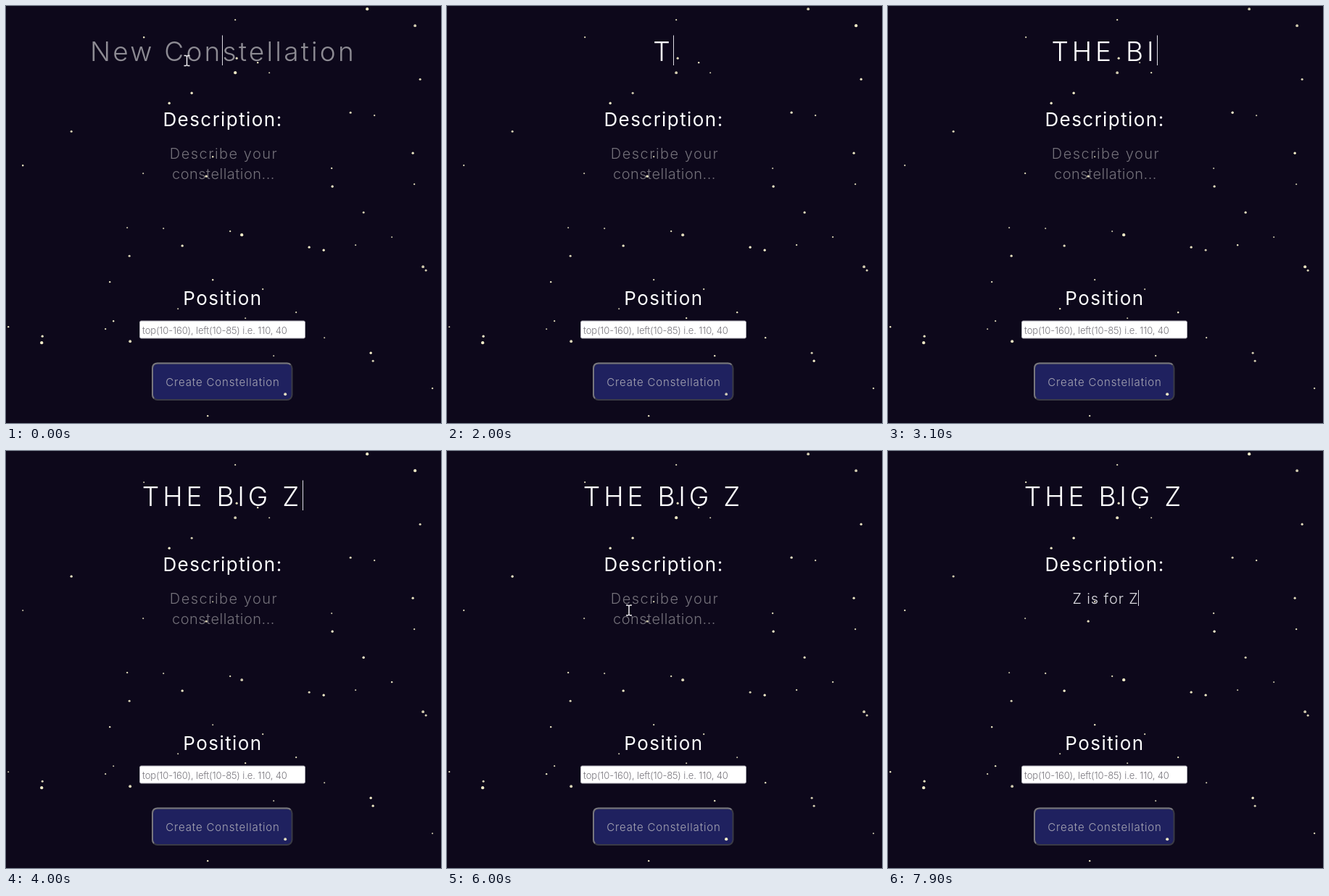
These frames come from a looping animation (600 px wide and 576 px high, 8 s). An HTML page:

```html
<!DOCTYPE html>
<html lang="en">
<head>
<meta charset="utf-8">
<title>New Constellation</title>
<style>
  html, body { margin: 0; width: 100%; height: 100%; overflow: hidden; background: #0d081b; }
  svg { display: block; width: 600px; height: 576px; }
  text { font-family: Inter, "DejaVu Sans", sans-serif; font-weight: 300; fill: #fff; white-space: pre; }
  .mid { text-anchor: middle; }
  .title { font-size: 37px; letter-spacing: .13em; }
  .title.hint { letter-spacing: .087em; fill: #8d8b93; }
  .head { font-size: 26px; letter-spacing: .055em; font-weight: 400; }
  .desc { font-size: 20px; letter-spacing: .045em; fill: #dddce2; }
  .desc.hint { fill: #737079; }
  .wide { letter-spacing: .073em; }
  .tight { letter-spacing: .025em; }
  .field { font-size: 13px; letter-spacing: -.01em; fill: #77757c; }
  .button { font-size: 15px; letter-spacing: .055em; fill: #a8a7b4; }
  .option { font: 11px "Open Sans", "Noto Sans", sans-serif; letter-spacing: -.03em; fill: #fbfbfe; }
</style>
</head>
<body>
<svg viewBox="0 0 600 576">
  <rect width="600" height="576" fill="#0d081b"/>

  <g id="titleHint"><text class="mid title hint" x="299.5" y="76">New Constellation</text></g>
  <text id="title" class="mid title" x="298.5" y="76"></text>

  <text class="mid head" x="299" y="165.5">Description:</text>
  <g id="descHint">
    <text class="mid desc hint wide" x="300.5" y="211">Describe your</text>
    <text class="mid desc hint tight" x="300" y="239">constellation...</text>
  </g>
  <text id="desc" class="mid desc" x="300" y="211"></text>

  <text class="mid head" x="299" y="412.5">Position</text>
  <rect x="184.5" y="435" width="228" height="24" rx="2" fill="#fff" stroke="#a9a7b0"/>
  <text class="field" x="188" y="452.5">top(10-160), left(10-85) i.e. 110, 40</text>

  <rect x="202" y="493.5" width="192.5" height="50.5" rx="7" fill="#1f215f" stroke="#3a3a45" stroke-width="2"/>
  <path d="M204 542Q202 540 202 537V500.500Q202 493.500 209 493.500H387.500Q391 493.500 392.500 495.500"
        fill="none" stroke="#77767d" stroke-width="2"/>
  <text class="mid button" x="299" y="524.5">Create Constellation</text>

  <g id="stars" fill="#f3edc9"></g>

  <g id="menu">
    <rect x="81.5" y="87.5" width="434" height="90" rx="3" fill="#2b2a33" stroke="#5a5963"/>
  </g>
  <rect id="caret" width="1" fill="#dcdbe2"/>
  <path id="pointer" d="M-4 -7H-1.500L0 -6L1.500 -7H4M0 -6V6M-4 7H-1.500L0 6L1.500 7H4"
        fill="none" stroke="#f2f0f4" stroke-width="1.5"/>
</svg>
<script>
const LOOP = 8000, STEP = 100, BLINK = 530;
const $ = id => document.getElementById(id);

function add(parent, tag, attrs, text = '') {
  const el = document.createElementNS('http://www.w3.org/2000/svg', tag);
  for (const key in attrs) el.setAttribute(key, attrs[key]);
  el.textContent = text;
  return parent.appendChild(el);
}

// x, y pairs grouped by star radius
const sky = [
  [2, '498,4 564,27 316,92 325,316 575,360 171,463 49,465 385,536'],
  [1.6, '225,134 256,120 90,173 475,147 561,203 571,101 450,249 493,285 243,331 170,345 ' +
        '418,333 438,337 276,235 503,479 506,490 579,365 318,72 50,456'],
  [1.1, '190,43 316,19 347,78 363,92 508,151 449,224 563,246 532,319 482,330 309,311 217,307 ' +
        '167,306 143,381 285,378 354,391 237,418 400,423 330,431 148,435 137,446 3,443 439,458 ' +
        '369,483 588,528 278,566 23,220 189,231 285,208'],
];
const stars = sky.flatMap(([r, list]) => list.split(' ').map(pair => {
  const [x, y] = pair.split(',').map(Number);
  return { r, phase: x * 1.7 + y, turns: 4 + (x + y) % 5,
           el: add($('stars'), 'circle', { cx: x + .2, cy: y + .2, r }) };
}));

["THE NOMAD'S TRISKELION", 'THE TRISKELION', 'THE ALABASTAN CROSS', 'THE KOA CARVER', "HAWTHORN'S HEADACHE"]
  .forEach((name, i) => add($('menu'), 'text', { class: 'option', x: 86, y: 101 + i * 17.9 }, name));

// Each key press time reveals one more letter
const fields = {
  title: { text: 'THE BIG Z', keys: [1900, 2100, 2300, 2600, 2800, 3000, 3200, 3400, 3700], x: 298.5, top: 40.5, height: 41.5 },
  desc: { text: 'Z is for Z', keys: [6300, 6500, 6600, 6700, 6800, 7100, 7200, 7300, 7500, 7800], x: 300, top: 192, height: 22 },
};
const FOCUS_DESC = 5000;

function type(id, t) {
  const { text, keys } = fields[id];
  const typed = text.slice(0, keys.filter(k => k <= t).length);
  if ($(id).textContent !== typed) $(id).textContent = typed;
  show(id + 'Hint', !typed);
  return typed;
}

function show(id, on) {
  $(id).style.display = on ? '' : 'none';
}

function drawCaret(t) {
  const id = t < FOCUS_DESC ? 'title' : 'desc';
  const f = fields[id];
  const since = Math.max(id === 'title' ? 0 : FOCUS_DESC, ...f.keys.filter(k => k <= t));
  const width = $(id).textContent ? $(id).getComputedTextLength() : 0;
  const caret = $('caret');
  caret.setAttribute('x', Math.round(f.x + width / 2 - .5));
  caret.setAttribute('y', f.top);
  caret.setAttribute('height', f.height);
  show('caret', Math.floor((t - since) / BLINK) % 2 === 0);
}

function drawPointer(t) {
  const p = Math.min(1, Math.max(0, (t - 4300) / 600));
  const ease = p * p * (3 - 2 * p);
  $('pointer').setAttribute('transform', `translate(${249.5 + 1.5 * ease} ${75.5 + 144.5 * ease})`);
  show('pointer', t < 1900 || (t >= 4300 && t < 6300));
}

function draw(now) {
  const t = Math.floor(now % LOOP / STEP) * STEP;
  for (const s of stars) {
    const wave = Math.sin(t / LOOP * s.turns * 2 * Math.PI + s.phase);
    s.el.setAttribute('r', s.r * (1 + .07 * wave));
    s.el.setAttribute('opacity', .92 + .08 * wave);
  }
  type('title', t);
  type('desc', t);
  show('menu', t >= 2100 && t < 2800);
  drawCaret(t);
  drawPointer(t);
}

const start = performance.now();
function tick() {
  draw(performance.now() - start);
  requestAnimationFrame(tick);
}
tick();
</script>
</body>
</html>
```
